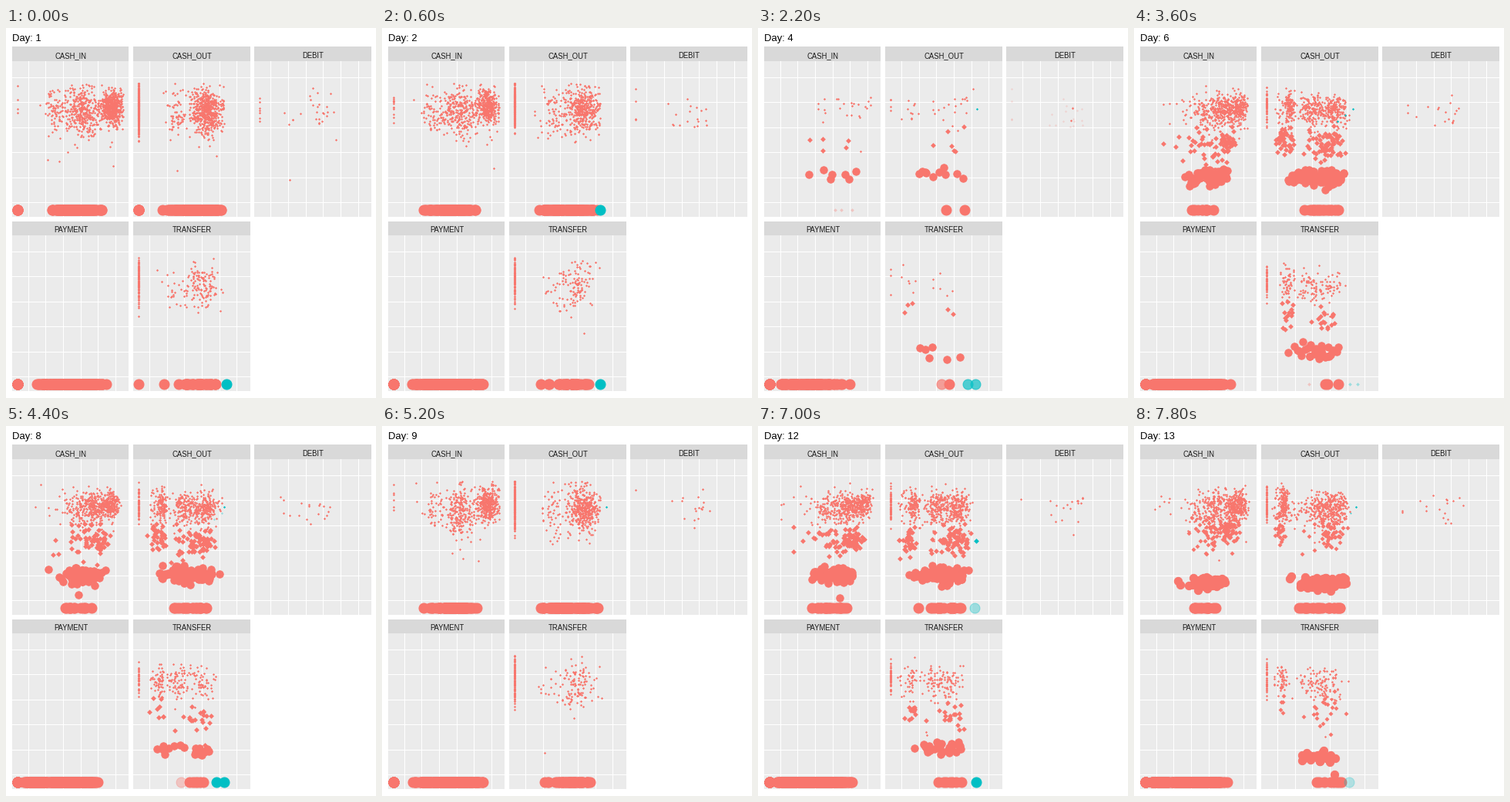
A matplotlib script for the animation above (8000 ms loop, 480 by 480 pixels).

```python
import numpy as np
import matplotlib.pyplot as plt
from matplotlib.animation import FuncAnimation
from matplotlib.colors import to_rgb
from matplotlib.patches import Rectangle
from matplotlib.path import Path

SIZE, FRAMES, STEP = 480, 40, 200
PX = 0.9                      # points per pixel at 80 dpi
SALMON, TEAL = to_rgb("#F8766D"), to_rgb("#00BFC4")
ZERO, FLOOR = 15, 236         # panel positions of x = 0 and y = 0
SMALL, LARGE, EDGE = 3.2, 14, 1
DAYS = range(1, 14)
KEY = {d: int((d - 1) * 3.3 + 0.5) for d in DAYS}

DISC = Path.circle(radius=.5)
DIAMOND = Path([(0, .5), (.5, 0), (0, -.5), (-.5, 0), (0, .5)], closed=True)

# blobs: x, y, x spread, y spread, weight; ground: x, spread, low, high
# counts: day 1, day 2, quiet days, other days; fraud: number on each day
PANELS = {
    "CASH_IN": dict(
        at=(0, 0), blobs=[(137, 102, 7, 11, .56), (100, 108, 11, 16, .36), (66, 108, 8, 14, .08)],
        xmax=152, column=.008, floor=.13, ground=(92, 15, 53, 124), corner=0,
        counts=(1150, 850, 36, 720), day3=[(134, 99)]),
    "CASH_OUT": dict(
        at=(157, 0), blobs=[(103, 106, 11, 14, .87), (64, 112, 9, 16, .13)],
        xmax=126, column=.29, floor=.15, ground=(86, 18, 46, 123), corner=0,
        counts=(1100, 850, 50, 800), day3=[(ZERO, 81), (104, 149)],
        fraud=(0, 1, 1, 1, 1, 3, 3, 1, 1, 1, 2, 1, 2)),
    "DEBIT": dict(
        at=(314, 0), blobs=[(97, 107, 9, 14, .8), (64, 115, 9, 12, .2)],
        xmax=120, column=.16, floor=0, ground=(90, 10, 60, 110), corner=0,
        counts=(34, 22, 2, 18)),
    "PAYMENT": dict(
        at=(0, 226), blobs=[(100, 108, 9, 16, 1)],
        xmax=150, column=0, floor=1, ground=(85, 24, 39, 131), corner=.35,
        counts=(400, 350, 110, 350), day3=[(ZERO, FLOOR), (90, FLOOR), (101, FLOOR)]),
    "TRANSFER": dict(
        at=(157, 226), blobs=[(96, 108, 11, 14, .85), (62, 112, 9, 13, .15)],
        xmax=130, column=.38, floor=.14, ground=(94, 15, 46, 118), corner=0,
        counts=(290, 240, 26, 270), day3=[(ZERO, 87)],
        fraud=(1, 1, 2, 2, 0, 0, 2, 2, 0, 2, 1, 1, 0)),
}


def points(x, y):
    """Rows of x, y and weight (1 on the floor, else 0)."""
    x, y = np.broadcast_arrays(np.asarray(x, float), np.asarray(y, float))
    return np.column_stack([x, y, y == FLOOR])


def ground_x(rng, p, n):
    mid, spread, low, high = p["ground"]
    x = rng.normal(mid, spread, n)
    return np.where((x < low) | (x > high), rng.uniform(low, high, n), x)


def cloud(name, day):
    p = PANELS[name]
    rng = np.random.default_rng(1000 * list(PANELS).index(name) + day)
    first, second, quiet, usual = p["counts"]
    n = {1: first, 2: second, 4: quiet, 5: quiet}.get(day, usual)

    blobs = np.array(p["blobs"])
    b = blobs[rng.choice(len(blobs), n, p=blobs[:, 4])]
    x, y = rng.normal(b[:, 0], b[:, 2]), rng.normal(b[:, 1], b[:, 3])
    x = p["xmax"] - abs(p["xmax"] - x)
    y = 72 + abs(y - 72) + (rng.random(n) < .03) * rng.exponential(24, n)
    y = np.minimum(y, 198)

    kind = rng.random(n)
    column = kind < p["column"]
    x[column] = ZERO
    y[column] = np.clip(rng.normal(101, 15, column.sum()), 72, 148)

    floor = kind >= 1 - p["floor"]
    gx = ground_x(rng, p, n)
    corner = p["corner"] or (.04 if day == 1 else 0)
    gx[rng.random(n) < corner] = ZERO
    x[floor], y[floor] = gx[floor], FLOOR

    # a few late floor points, which fade when the next day has fewer
    late = ground_x(rng, p, rng.integers(0, 4)) if p["floor"] else []
    return np.vstack([points(x, y), points(late, FLOOR)])


def panel_days(name):
    if name == "DEBIT":       # nothing happens on days 3 and 4
        return {d: cloud(name, d) for d in DAYS if d not in (3, 4)}
    states = {d: cloud(name, d) for d in DAYS}
    states[3] = points(*zip(*PANELS[name]["day3"]))
    return states


def fraud_days(name):
    states = {}
    for d, n in zip(DAYS, PANELS[name]["fraud"]):
        x = 128 - 10 * np.arange(n) + 6 * np.sin(3 * d)
        low = name == "TRANSFER" or d % 8 in (2, 3)
        states[d] = points(x, FLOOR if low else 105 + 8 * np.arange(n))
    return states


def blend(states, i):
    """Rows of x, y, diameter and alpha at frame i."""
    days = sorted(states)
    k = max(j for j, d in enumerate(days[:-1]) if KEY[d] <= i)
    start, end = KEY[days[k]], KEY[days[k + 1]]
    t = (i - start) / (end - start)
    a, b = states[days[k]], states[days[k + 1]]
    m = min(len(a), len(b))

    def rows(p, grow, alpha):
        d = (SMALL + (LARGE - SMALL) * p[:, 2]) * grow
        return np.column_stack([p[:, :2], d, np.full(len(p), alpha)])

    parts = [rows(a[:m] * (1 - t) + b[:m] * t, 1, 1), rows(a[m:], 1, 1 - t)]
    if t > 0:
        parts.append(rows(b[m:], t, t))
    return np.vstack(parts)


LAYERS = [(p["at"], SALMON, panel_days(n)) for n, p in PANELS.items()]
LAYERS += [(p["at"], TEAL, fraud_days(n)) for n, p in PANELS.items() if "fraud" in p]

fig = plt.figure(figsize=(6, 6), dpi=80, facecolor="white")
ax = fig.add_axes([0, 0, 1, 1])
ax.set_xlim(-.5, SIZE - .5)
ax.set_ylim(SIZE - .5, -.5)
ax.axis("off")


def box(x, y, w, h, color):
    ax.add_patch(Rectangle((x - .5, y - .5), w, h, fc=color, lw=0, aa=False, zorder=1))


def draw_panel(name, dx, dy):
    left, top = 8 + dx, 43 + dy
    width = 152 if dx else 151
    strip = 251 if dy else 24
    box(left, strip, width, top - strip, "#D9D9D9")
    box(left, top, width, 202, "#EBEBEB")
    for k in range(6):
        box(round(28.8 + dx * 157.3 / 157 + 22.62 * k), top, 1, 202, "white")
        box(left, round(64 + 32.4 * k) + dy, width, 1, "white")
    ax.text(left + 75.5, 38.4 + dy, name, family="Liberation Sans", size=9.5 * PX,
            color="#1A1A1A", ha="center", va="baseline")


for name, p in PANELS.items():
    draw_panel(name, *p["at"])

title = ax.text(7.5, 16.6, "", family="Liberation Sans", size=13 * PX,
                color="black", va="baseline")
dots = ax.scatter([], [], zorder=3)


def update(i):
    title.set_text(f"Day: {int(1.5 + i * 30 / 99)}")
    places, diams, colors = [], [], []
    for at, color, states in LAYERS:
        r = blend(states, i)
        places.append(np.round(r[:, :2] + at))
        diams.append(r[:, 2])
        colors.append(np.column_stack([np.tile(color, (len(r), 1)), r[:, 3]]))
    diam = np.concatenate(diams)
    edge = np.where(diam < 8, 0, EDGE)
    dots.set_paths([DIAMOND if d < 8 else DISC for d in diam])
    dots.set_offsets(np.vstack(places))
    dots.set_sizes(((diam - edge) * PX) ** 2, fig.dpi)
    dots.set_linewidths(edge * PX)
    dots.set_color(np.vstack(colors))
    return title, dots


anim = FuncAnimation(fig, update, frames=FRAMES, interval=STEP, repeat=True,
                     repeat_delay=0, init_func=lambda: update(0))
plt.show()
```
